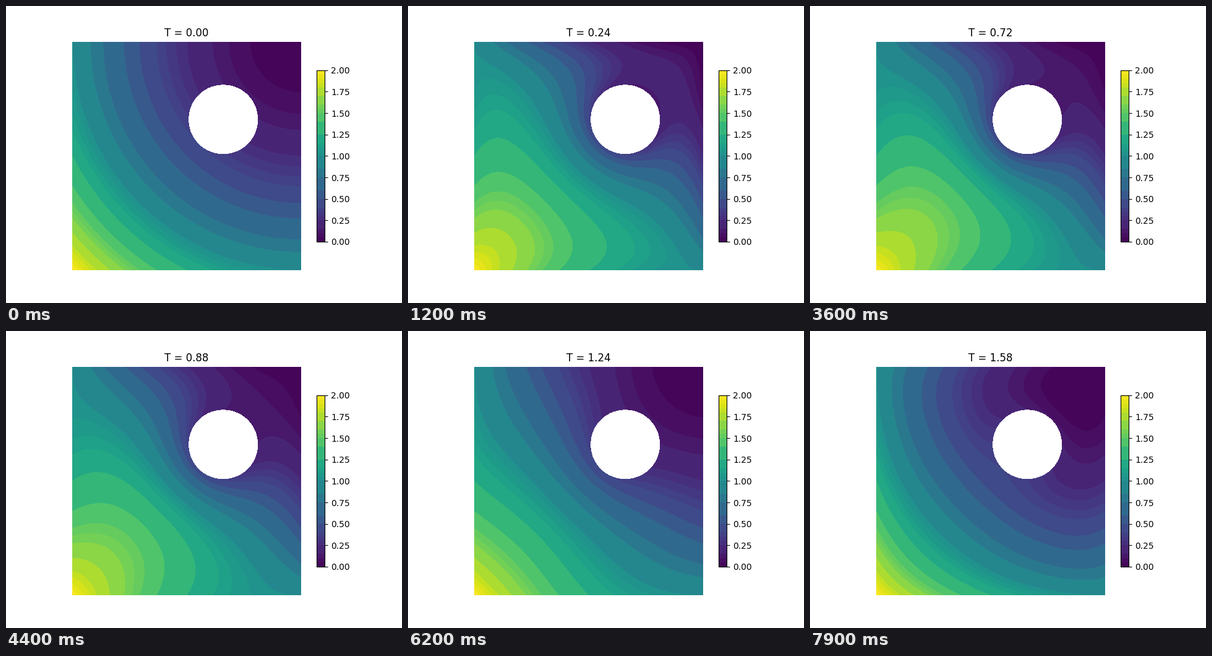
These frames come from a looping animation (640x480 px, 8 s). A matplotlib script:

```python
import numpy as np
import matplotlib.pyplot as plt
from matplotlib.animation import FuncAnimation
from matplotlib.patches import Circle

# Heat equation on a unit square with a round hole. Edge values stay fixed
# and a uniform source fades over time. Backward Euler in time.
N, FRAMES, DT, KAPPA = 50, 80, 0.02, 0.1
C, R = 0.66, 0.15
H = 1 / N

axis = np.linspace(0, 1, N + 1)
X, Y = np.meshgrid(axis, axis)
START = (1 - X) ** 2 + (1 - Y) ** 2
DIST = np.hypot(X - C, Y - C) - R

free = DIST > 1e-9
free[[0, -1], :] = False
free[:, [0, -1]] = False
index = np.full(X.shape, -1)
index[free] = np.arange(free.sum())


def source(t):
    return 2 - 2 * t


def leg(j, i, dj, di):
    """Length, in cells, from a node to its neighbour or to the hole's rim."""
    if DIST[j + dj, i + di] > 1e-9:
        return 1.0
    px, py = axis[i] - C, axis[j] - C
    b = px * di + py * dj
    disc = max(b * b - (px * px + py * py - R * R), 0)
    return (-b - disc ** 0.5) / H


def laplacian():
    n = free.sum()
    lap = np.zeros((n, n))
    for j, i in zip(*np.nonzero(free)):
        k = index[j, i]
        for dj, di in ((0, 1), (1, 0)):
            a, b = leg(j, i, -dj, -di), leg(j, i, dj, di)
            lap[k, k] -= 2 / (a * b)
            for sign, near in ((-1, a), (1, b)):
                m = index[j + sign * dj, i + sign * di]
                if m >= 0:
                    lap[k, m] += 2 / (near * (a + b))
    return lap / H ** 2


# Nodes just inside the rim mirror the outside, so contours meet it cleanly.
ghost = (DIST <= 0) & (DIST > -2 * H)
stretch = (R - DIST[ghost]) / (R + DIST[ghost])
gx = (C + (X[ghost] - C) * stretch) / H
gy = (C + (Y[ghost] - C) * stretch) / H
gi, gj = gx.astype(int), gy.astype(int)
fx, fy = gx - gi, gy - gj


def full_field(v):
    w = np.zeros_like(X)
    w[free] = v
    for _ in range(4):
        low = w[gj, gi] * (1 - fx) + w[gj, gi + 1] * fx
        high = w[gj + 1, gi] * (1 - fx) + w[gj + 1, gi + 1] * fx
        w[ghost] = -(low * (1 - fy) + high * fy)
    return np.clip(START + w, 0, 2)


def simulate():
    n = free.sum()
    step = np.linalg.inv(np.eye(n) - DT * KAPPA * laplacian())
    v = np.zeros(n)
    fields = [full_field(v)]
    for k in range(1, FRAMES):
        v = step @ (v + DT * (source(k * DT) + 4 * KAPPA))
        fields.append(full_field(v))
    return fields


fields = simulate()

levels = [0, .05, .1, .15, .25, .3, .35, .4, .5, .6, .75, .85, 1, 1.05, 1.1,
          1.15, 1.25, 1.4, 1.5, 1.55, 1.6, 1.7, 1.8, 1.85, 1.9, 1.95, 2]
mids = (np.array(levels[1:]) + np.array(levels[:-1])) / 2
colors = [tuple(c) for c in plt.get_cmap("viridis")(mids / 2)]

fig, ax = plt.subplots(figsize=(6.4, 4.8), dpi=100)
ax.set_aspect("equal")
ax.set_xlim(0, 1)
ax.set_ylim(0, 1)
ax.axis("off")
ax.add_patch(Circle((C, C), R, color="white", lw=0, antialiased=False,
                    zorder=3))


def fill(k):
    ax.set_title(f"T = {k * DT:.2f}")
    return ax.contourf(X, Y, fields[k], levels=levels, colors=colors)


bands = fill(0)
fig.colorbar(bands, ax=ax, shrink=0.75, spacing="proportional",
             ticks=np.linspace(0, 2, 9), format="%.2f")


def update(k):
    global bands
    bands.remove()
    bands = fill(k)
    return [bands]


anim = FuncAnimation(fig, update, frames=FRAMES, interval=100,
                     init_func=lambda: [], repeat=True, repeat_delay=0,
                     blit=False)
plt.show()
```
